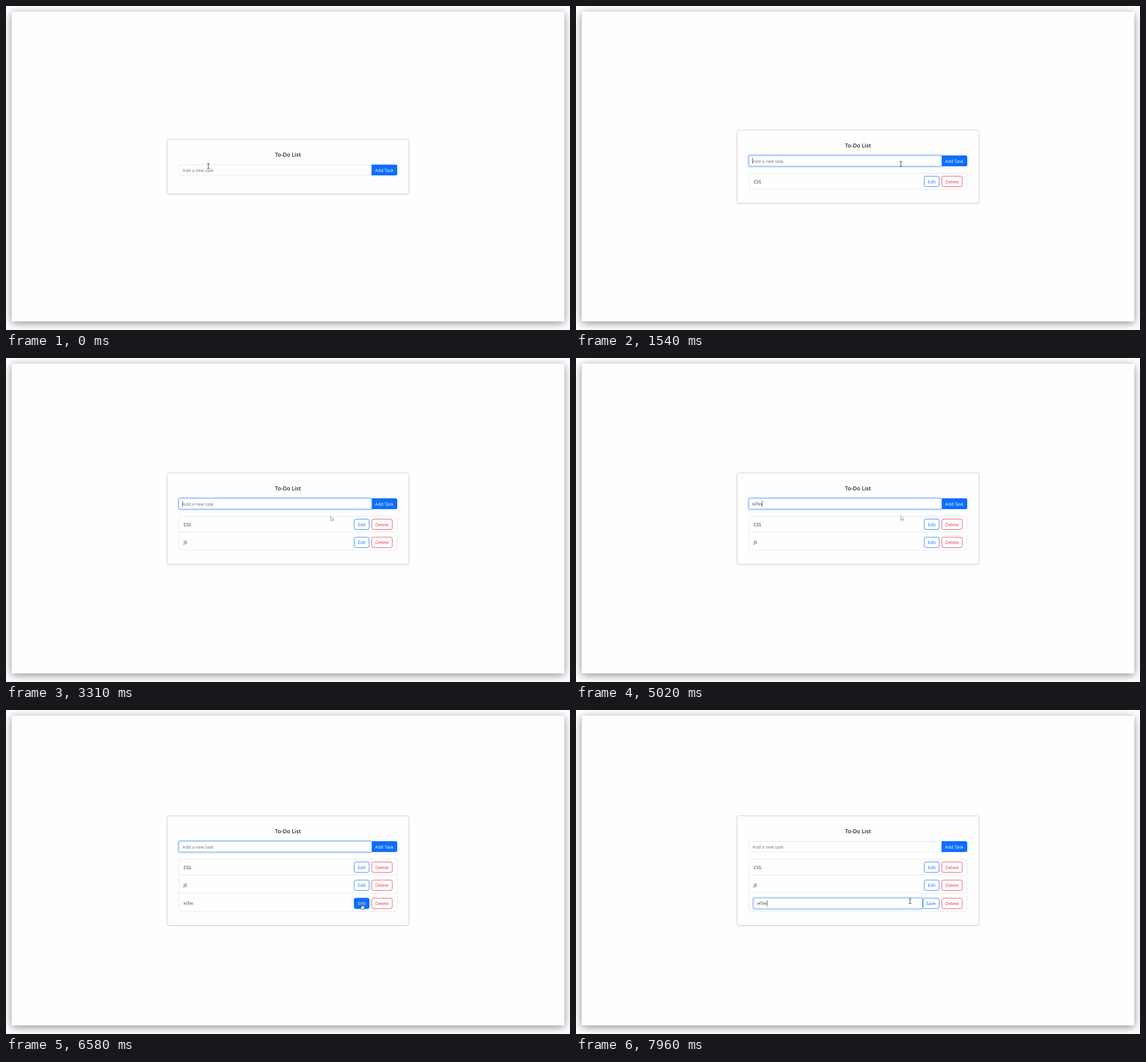
An HTML page for the animation above (8 s loop, 986x568 px).

```html
<!DOCTYPE html>
<html lang="en">
<head>
<meta charset="utf-8">
<title>To-Do List</title>
<style>
  html, body { margin: 0; width: 100%; height: 100%; overflow: hidden; background: #fff; }
  .window {
    position: absolute; left: 10px; top: 10px; width: 966px; height: 543px;
    background: #fefefe; box-shadow: 0 3px 14px rgba(0, 0, 0, .45);
  }
  svg { position: absolute; left: 0; top: 0; display: block; }
  text {
    font: 7.72px "Open Sans", "Noto Sans", sans-serif;
    fill: #212529; text-rendering: geometricPrecision;
  }
  .title { font-size: 9.6px; font-weight: 600; }
  .hint { fill: #6c757d; }
  .mid { text-anchor: middle; }
  .card { fill: #fefefe; stroke: #d3d3d4; filter: drop-shadow(0 1px 1px rgba(0, 0, 0, .09)); }
  .line { fill: none; stroke: #dee2e6; stroke-width: .8; }
</style>
</head>
<body>
<div class="window"></div>
<svg width="986" height="568" viewBox="0 0 986 568">
  <g id="app"></g>
  <g id="pointer"></g>
</svg>
<script>
const LOOP = 8000;
const BLUE = '#0d6efd', RED = '#dc3545', INK = '#212529';
const TASKS = ['CSS', 'JS', 'HTm'];

// Each track is a list of [start time, value...]
const tracks = {
  typed: [[0, ''], [970, 'CS'], [1230, 'CSS'], [1450, ''], [2920, 'J'], [3000, 'JS'], [3310, ''],
    [4090, 'H'], [4700, 'HT'], [5020, 'HTm'], [5300, '']],
  count: [[0, 0], [1450, 1], [3310, 2], [5300, 3]],
  caret: [[0, 0], [310, 1], [810, 0], [970, 1], [1770, 0], [2270, 1], [2750, 0], [2920, 1],
    [3560, 0], [4090, 1], [4620, 0], [4700, 1], [5530, 0], [6020, 1], [6580, 0]],
  focus: [[0, 0], [310, .5], [390, 1], [6670, .5], [6780, 0]],
  hover: [[0, 0], [6390, .5], [6480, 1], [7540, .4], [7630, 0]],
  editing: [[0, 0], [6780, 1]],
  editFocus: [[0, 0], [7880, .5], [7960, .9]]
};
const pointerTrack = [
  [0, 'beam', 353.8, 280.6], [390, 'beam', 391, 279], [470, 'beam', 482, 278],
  [560, 'beam', 551, 278], [640, 'arrow', 567.3, 276.8], [1540, 'beam', 568, 276.8],
  [3310, 'arrow', 567.3, 276.8], [4090, 'arrow', 567.3, 276.4], [5930, 'arrow', 570, 281],
  [6020, 'arrow', 577, 293], [6110, 'arrow', 588, 310], [6210, 'arrow', 600, 326],
  [6300, 'arrow', 607, 335], [6390, 'hand', 617, 339], [6480, 'hand', 621.5, 339.5],
  [7460, 'hand', 617, 338.5], [7540, 'beam', 601, 337], [7630, 'beam', 590, 335.5],
  [7710, 'beam', 585, 335.2], [7790, 'beam', 584, 335.2]
];
const shapes = {
  beam: '<path d="M-2.3-4.2H-.7Q0-4.2 0-3.6Q0-4.2 .7-4.2H2.3M0-3.8V3.8M-2.3 4.2H-.7Q0 4.2 0 3.6Q0 4.2 .7 4.2H2.3" fill="none" stroke="#333" stroke-width=".9"/>',
  arrow: '<path d="M0 0V8.2L1.9 6.5L3.2 9.2L4.5 8.6L3.3 6H5.9Z" fill="#fff" stroke="#666" stroke-width=".6"/>',
  hand: '<path d="M0 .3Q.8-.5 1.4 .4V4L4.3 4.6Q5.4 5 5.2 6.2L4.4 9.8H.1L-2.3 6.6Q-2.4 5.4-1.3 5.6L0 6.6Z" fill="#fff" stroke="#222" stroke-width=".7"/>'
};

const pen = document.createElement('canvas').getContext('2d');
pen.font = '77.2px "Open Sans", "Noto Sans", sans-serif';
const textWidth = s => pen.measureText(s).width / 10;

function at(track, t) {
  let hit = track[0];
  for (const step of track) if (step[0] <= t) hit = step;
  return hit;
}

const rect = (x, y, w, h, attrs) =>
  `<rect x="${x}" y="${y}" width="${w}" height="${h}" ${attrs}/>`;
const label = (x, y, s, attrs = '') => `<text x="${x}" y="${y}" ${attrs}>${s}</text>`;
const caretLine = (x, y) => rect(x, y, .7, 10.6, `fill="${INK}"`);

function glow(x, y, w, h, k) {
  if (!k) return '';
  return rect(x - 1, y - 1, w + 2, h + 2,
      `rx="3.5" fill="none" stroke="${BLUE}" stroke-width="2" opacity="${.27 * k}"`) +
    rect(x + .3, y + .3, w - .6, h - .6,
      `rx="3" fill="none" stroke="#86b7fe" stroke-width=".8" opacity="${k}"`);
}

function button(x, y, w, s, color, fill = 0) {
  const mid = x + w / 2, base = y + 12.5;
  const body = rect(x + .4, y + .4, w - .8, 18.2, `rx="2.8" fill="none" stroke="${color}" stroke-width=".8"`) +
    label(mid, base, s, `class="mid" style="fill:${color}"`);
  if (!fill) return body;
  return body + `<g opacity="${fill}">` + rect(x, y, w, 19, `rx="3" fill="${color}"`) +
    label(mid, base, s, 'class="mid" style="fill:#fff"') + '</g>';
}

function rowBorder(y, first, last) {
  const l = 302.5, r = 683.6, b = y + 27.7, c = 3;
  const left = first ? `M${l + c} ${y}Q${l} ${y} ${l} ${y + c}` : `M${l} ${y}`;
  const foot = last
    ? `V${b - c}Q${l} ${b} ${l + c} ${b}H${r - c}Q${r} ${b} ${r} ${b - c}`
    : `V${b}H${r}`;
  const right = first ? `V${y + c}Q${r} ${y} ${r - c} ${y}Z` : `V${y}`;
  return `<path class="line" d="${left}${foot}${right}"/>`;
}

function row(i, top, s) {
  const y = top + 76 + 31.75 * i;
  const active = i === 2;
  const by = y + 4.5;
  let out = rowBorder(y, i === 0, i === s.count - 1);
  if (active && s.editing) {
    out += rect(310.4, by + .4, 295, 18.2, 'rx="3" class="line"') +
      glow(310, by, 295.7, 19, s.editFocus) +
      label(317, by + 12.5, TASKS[i]);
    if (s.editFocus) out += caretLine(317 + textWidth(TASKS[i]), by + 4.2);
    out += button(606, by, 29.2, 'Save', BLUE, s.hover);
  } else {
    out += label(310.5, by + 12.5, TASKS[i]) +
      button(608.4, by, 26.8, 'Edit', BLUE, active ? s.hover : 0);
  }
  return out + button(639.2, by, 36.4, 'Delete', RED);
}

function app(s) {
  const top = 233.5 - 16 * s.count;
  const iy = top + 44.5;
  let out = rect(281.5, top, 423, 96 + 32 * s.count, 'rx="3" class="card"') +
    label(493, top + 30.2, 'To-Do List', 'class="title mid"') +
    rect(302.4, iy + .4, 338, 18.2, 'rx="3" class="line"') +
    glow(302, iy, 337.7, 19, s.focus) +
    `<path d="M${s.focus ? 639.6 : 639} ${iy}H681Q684 ${iy} 684 ${iy + 3}V${iy + 16}Q684 ${iy + 19} 681 ${iy + 19}H${s.focus ? 639.6 : 639}Z" fill="${BLUE}"/>` +
    label(661.3, iy + 12.5, 'Add Task', 'class="mid" style="fill:#fff"') +
    (s.typed ? label(308.6, iy + 12.5, s.typed)
             : label(308.6, iy + 12.5, 'Add a new task', 'class="hint"'));
  if (s.caret) out += caretLine(308.3 + textWidth(s.typed), iy + 4.2);
  for (let i = 0; i < s.count; i++) out += row(i, top, s);
  return out;
}

const appNode = document.getElementById('app');
const pointerNode = document.getElementById('pointer');
let lastKey = '', lastStep = null;

function draw(t) {
  const s = {};
  for (const name in tracks) s[name] = at(tracks[name], t)[1];
  const key = Object.values(s).join('|');
  if (key !== lastKey) {
    appNode.innerHTML = app(s);
    lastKey = key;
  }
  const step = at(pointerTrack, t);
  if (step !== lastStep) {
    pointerNode.innerHTML = shapes[step[1]];
    pointerNode.setAttribute('transform', `translate(${step[2]} ${step[3]})`);
    lastStep = step;
  }
}

const start = performance.now();
function tick() {
  draw((performance.now() - start) % LOOP);
  requestAnimationFrame(tick);
}
tick();
</script>
</body>
</html>
```
